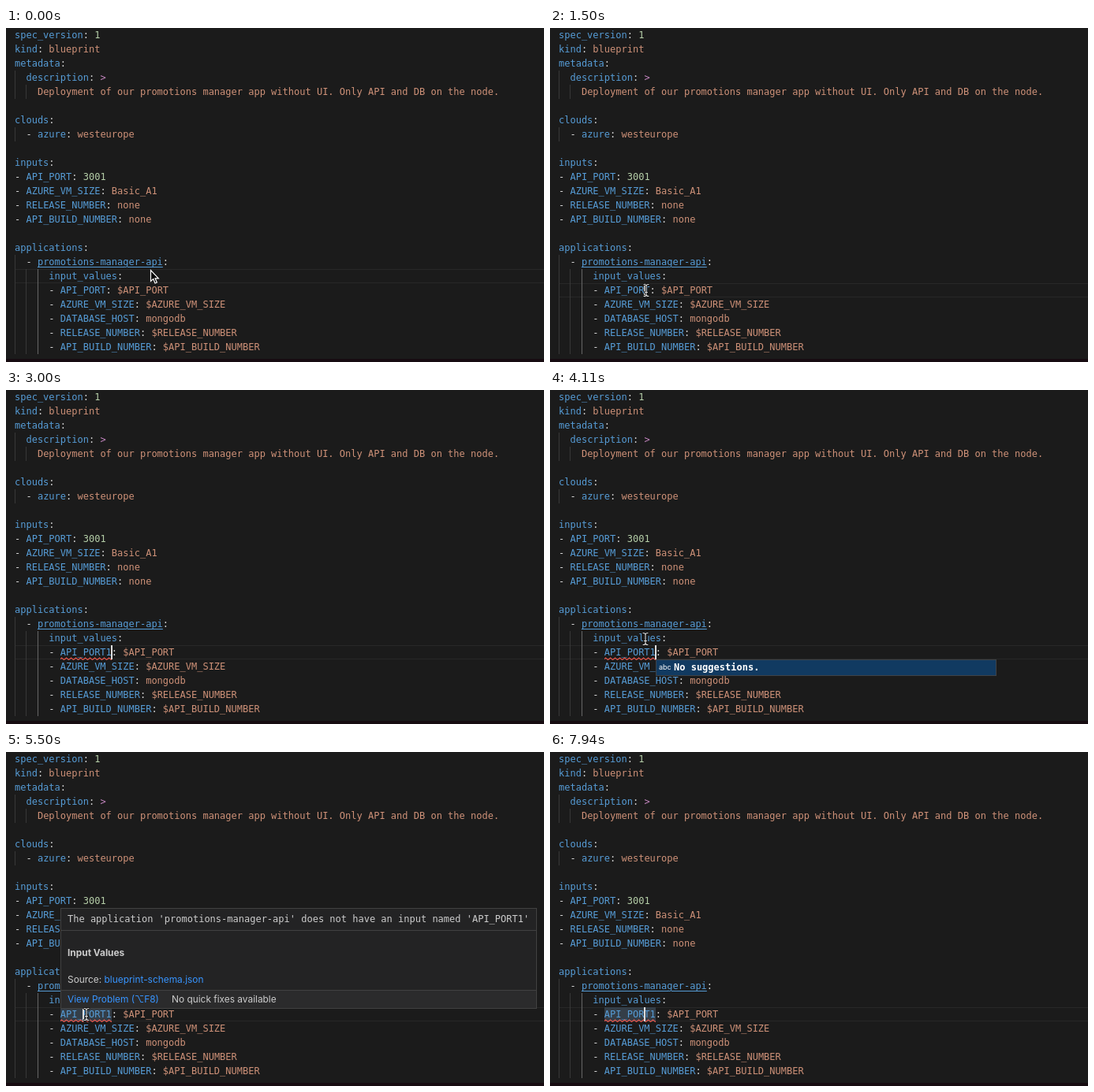
Write an HTML page that moves like this. It is 682 px wide and 424 px high and loops after 8 s.

```html
<!DOCTYPE html>
<html lang="en">
<head>
<meta charset="utf-8">
<title>Blueprint editor</title>
<style>
html, body { margin: 0; width: 100%; height: 100%; overflow: hidden; background: #1b1b1b; }
#stage { position: relative; width: 682px; height: 424px; overflow: hidden; background: #1b1b1b; }
#stage > *, .hover > * { position: absolute; }
pre, .mono { margin: 0; font: 12px/18px "DejaVu Sans Mono", monospace; white-space: pre; }
pre { left: 11px; top: 0; color: #d4d4d4; }
pre b { font-weight: normal; color: #569cd6; }
pre i { font-style: normal; color: #ce9178; }
.num { color: #b5cea8; }
.fold { color: #c586c0; }
.link { text-decoration: underline; text-underline-offset: 2px; }

.row { left: 11px; right: 0; top: 306px; height: 18px; box-sizing: border-box; border: solid #282828; border-width: 1px 0; }
.guide { width: 1px; background: #383838; }
.guide.active { background: #656565; }
.strip { left: 0; right: 0; top: 420px; height: 4px; background: #170c11; }
.word { left: 69px; top: 324px; width: 65px; height: 18px; background: #343e48; }
.squiggle { left: 69px; top: 338px; }
.caret { top: 324px; width: 2px; height: 18px; background: #dcdcdc; }

.suggest { left: 134px; top: 342px; width: 430px; height: 19px; border: 1px solid #3e4348; background: #113a61; color: #fff; }
.suggest span { position: absolute; left: 22px; top: 0; font-weight: bold; }
.suggest small { position: absolute; left: 3px; top: 0; font: 9px/18px Inter, sans-serif; }

.hover { left: 69px; top: 198px; width: 602px; height: 126px; border: 1px solid #414141; background: #232324; color: #ccc; font: 11.9px/18px Inter, sans-serif; white-space: pre; }
.hover > * { left: 8px; }
.hover a { color: #3794ff; }
.hover .rule { left: 0; right: 0; top: 27px; height: 1px; background: #414141; }
.hover .status { left: 0; right: 0; top: 103px; height: 22px; border-top: 1px solid #414141; background: #2b2b2c; }
.status span { position: absolute; top: 2px; }

.mouse { left: 0; top: 0; }
.mouse svg { position: absolute; overflow: visible; }

/* One loop is 8 s, so 1% is 80 ms. */
.row, .word, .squiggle, .caret, .suggest, .typed, .arrow, .beam { animation: 8s step-end infinite; }
.row { animation-name: row; }
.word { animation-name: word; }
.squiggle { animation-name: squiggle; }
.caret { animation-name: caret; }
.suggest { animation-name: suggest; }
.typed { animation-name: typed; }
.arrow { animation-name: arrow; }
.beam { animation-name: beam; }
.hover { animation: hover 8s linear infinite; }
.mouse { animation: mouse 8s ease-in-out infinite; }

@keyframes row { 0% { top: 306px } 16.25%, 100% { top: 324px } }
@keyframes word { 0% { opacity: 0 } 58%, 100% { opacity: 1 } }
@keyframes squiggle { 0% { opacity: 0 } 30%, 100% { opacity: 1 } }
@keyframes suggest { 0% { opacity: 0 } 45.625% { opacity: 1 } 55%, 100% { opacity: 0 } }
@keyframes typed { 0% { opacity: 0; margin-right: -1ch } 24.75%, 100% { opacity: 1; margin-right: 0 } }
@keyframes arrow { 0% { opacity: 1 } 9%, 100% { opacity: 0 } }
@keyframes beam {
  0% { opacity: 0 } 9% { opacity: 1 } 22.25% { opacity: 0 }
  47% { opacity: 1 } 97.5%, 100% { opacity: 0 }
}
@keyframes hover { 0%, 61% { opacity: 0 } 62.5%, 86.4% { opacity: 1 } 86.5%, 100% { opacity: 0 } }
@keyframes caret {
  0% { left: 119px; opacity: 0 }
  16.25% { left: 119px; opacity: 1 }
  22.25% { left: 126px; opacity: 1 }
  24.75% { left: 133px; opacity: 1 }
  31% { left: 133px; opacity: 0 }
  37.25% { left: 133px; opacity: 1 }
  43.5% { left: 133px; opacity: 0 }
  45.625% { left: 133px; opacity: 1 }
  51.875% { left: 133px; opacity: 0 }
  55% { left: 97px; opacity: 1 }
  61.25% { left: 97px; opacity: 0 }
  67.5% { left: 97px; opacity: 1 }
  73.75% { left: 97px; opacity: 0 }
  80% { left: 97px; opacity: 1 }
  86.25% { left: 97px; opacity: 0 }
  92.5% { left: 97px; opacity: 1 }
  97.5%, 100% { left: 119px; opacity: 1 }
}
@keyframes mouse {
  0%, 7.5% { transform: translate(183px, 307px) }
  15%, 45% { transform: translate(122px, 333px) }
  48.75%, 52.5% { transform: translate(121px, 316px) }
  54.5%, 84.5% { transform: translate(102px, 333px) }
  87.5%, 94% { transform: translate(148px, 333px) }
  97%, 100% { transform: translate(120px, 333px) }
}
</style>
</head>
<body>
<div id="stage">
  <div class="row"></div>
  <div class="guide" style="left:11px;top:54px;height:36px"></div>
  <div class="guide" style="left:25px;top:72px;height:18px"></div>
  <div class="guide" style="left:11px;top:126px;height:18px"></div>
  <div class="guide" style="left:11px;top:288px;height:126px"></div>
  <div class="guide" style="left:25px;top:306px;height:108px"></div>
  <div class="guide active" style="left:40px;top:306px;height:108px"></div>
  <div class="word"></div>
<pre><b>spec_version</b>: <span class="num">1</span>
<b>kind</b>: <i>blueprint</i>
<b>metadata</b>:
  <b>description</b>: <span class="fold">&gt;</span>
    <i>Deployment of our promotions manager app without UI. Only API and DB on the node.</i>

<b>clouds</b>:
  - <b>azure</b>: <i>westeurope</i>

<b>inputs</b>:
- <b>API_PORT</b>: <span class="num">3001</span>
- <b>AZURE_VM_SIZE</b>: <i>Basic_A1</i>
- <b>RELEASE_NUMBER</b>: <i>none</i>
- <b>API_BUILD_NUMBER</b>: <i>none</i>

<b>applications</b>:
  - <b class="link">promotions-manager-api</b>:
      <b>input_values</b>:
      - <b>API_PORT<span class="typed">1</span></b>: <i>$API_PORT</i>
      - <b>AZURE_VM_SIZE</b>: <i>$AZURE_VM_SIZE</i>
      - <b>DATABASE_HOST</b>: <i>mongodb</i>
      - <b>RELEASE_NUMBER</b>: <i>$RELEASE_NUMBER</i>
      - <b>API_BUILD_NUMBER</b>: <i>$API_BUILD_NUMBER</i></pre>
  <svg class="squiggle" width="65" height="5">
    <defs><pattern id="wave" width="6" height="5" patternUnits="userSpaceOnUse">
      <path d="M-1 4.5 L0 3.5 L1.5 2 L4.5 4.5 L7 2.4" fill="none" stroke="#e8564c" stroke-width="1.1"/>
    </pattern></defs>
    <rect width="65" height="5" fill="url(#wave)"/>
  </svg>
  <div class="caret"></div>
  <div class="suggest mono"><small>abc</small><span>No suggestions.</span></div>
  <div class="hover">
    <div class="mono" style="top:4px">The application 'promotions-manager-api' does not have an input named 'API_PORT1'</div>
    <div class="rule"></div>
    <strong style="top:47px">Input Values</strong>
    <div style="top:81px">Source: <a>blueprint-schema.json</a></div>
    <div class="status">
      <span style="left:8px"><a>View Problem (⌥F8)</a></span>
      <span style="left:140px">No quick fixes available</span>
    </div>
  </div>
  <div class="strip"></div>
  <div class="mouse">
    <svg class="arrow" width="12" height="18">
      <path d="M0.5 0.5 V14.5 L3.7 11.6 L6 17 L8.3 16 L6 10.8 H10.3 Z" fill="#000" stroke="#fff" stroke-width="1.2"/>
    </svg>
    <svg class="beam" width="1" height="1" fill="none" stroke-linecap="round">
      <path id="ibeam" d="M-3 -7.5 Q0 -7.5 0 -5.5 Q0 -7.5 3 -7.5 M0 -5.5 V5.5 M-3 7.5 Q0 7.5 0 5.5 Q0 7.5 3 7.5 M-1.5 2.5 H1.5" stroke="#111" stroke-width="2.6"/>
      <use href="#ibeam"/>
      <path d="M-3 -7.5 Q0 -7.5 0 -5.5 Q0 -7.5 3 -7.5 M0 -5.5 V5.5 M-3 7.5 Q0 7.5 0 5.5 Q0 7.5 3 7.5 M-1.5 2.5 H1.5" stroke="#e4e4e4" stroke-width="1.1"/>
    </svg>
  </div>
</div>
</body>
</html>
```
